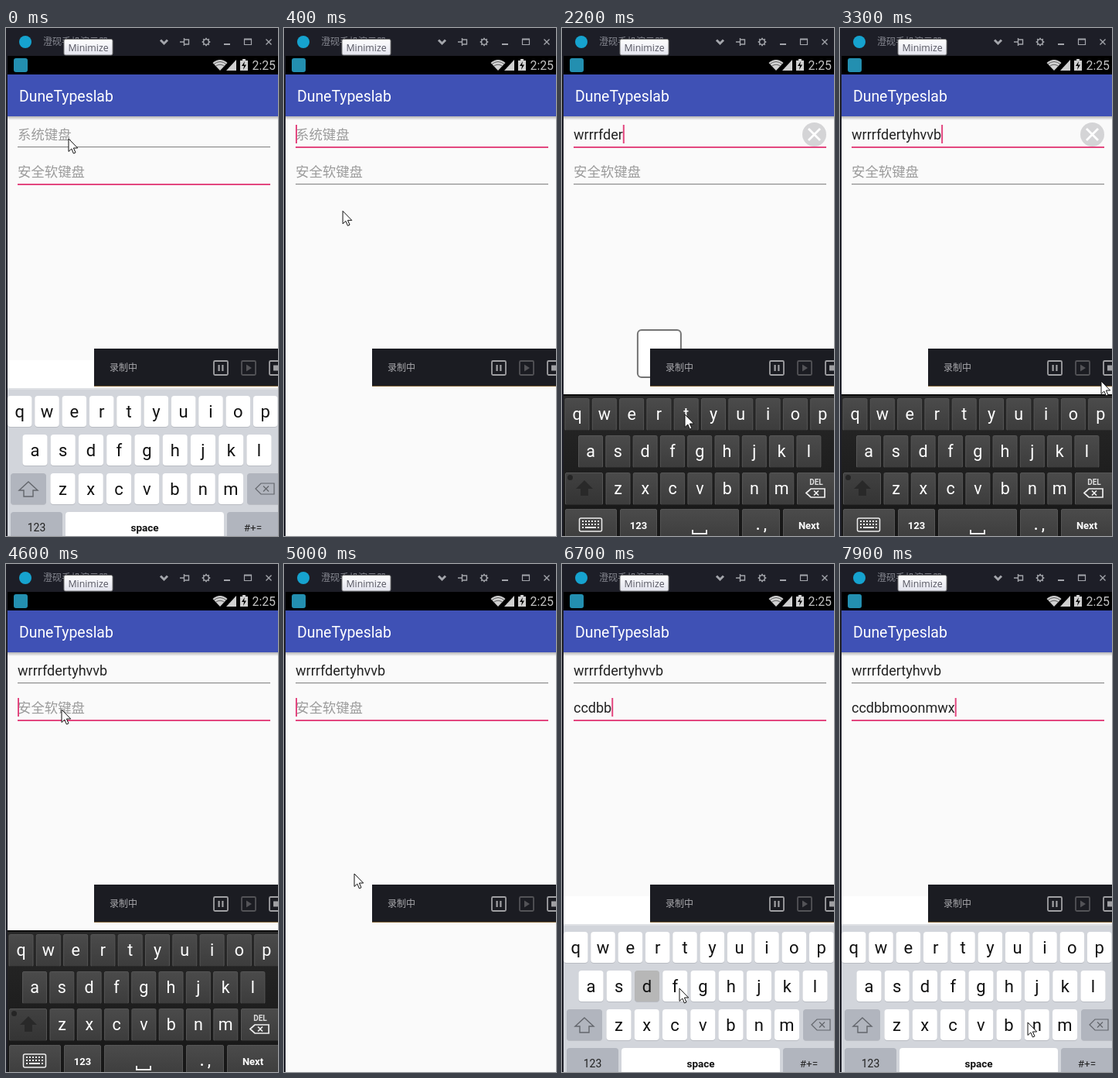
An HTML page with a canvas that plays this animation: 352x656 px, repeating every 8000 ms.

```html
<!DOCTYPE html>
<html lang="zh">
<head>
<meta charset="utf-8">
<style>
html, body { margin: 0; width: 100%; height: 100%; overflow: hidden; background: #fafafa; }
canvas { display: block; }
</style>
</head>
<body>
<canvas id="stage" width="352" height="656"></canvas>
<script>
const g = document.getElementById('stage').getContext('2d');
const ROBOTO = 'Roboto, sans-serif';
const CJK = '"Noto Sans CJK SC", "Noto Sans CJK", sans-serif';
const LOOP = 8000, STEP = 100;
const ROWS = ['qwertyuiop', 'asdfghjkl', 'zxcvbnm'];

// Typed characters: [time, letter]
const typed1 = [[1000, 'w'], [1100, 'r'], [1300, 'r'], [1500, 'r'], [1700, 'f'], [1800, 'd'], [1900, 'e'],
  [2100, 'r'], [2300, 't'], [2400, 'y'], [2500, 'h'], [2700, 'v'], [2800, 'v'], [3000, 'b']];
const typed2 = [[5600, 'c'], [5800, 'c'], [6000, 'd'], [6300, 'b'], [6400, 'b'], [6900, 'm'], [7000, 'o'],
  [7100, 'o'], [7300, 'n'], [7400, 'm'], [7600, 'w'], [7700, 'x']];

// Pointer stops besides the typed keys: [time, x, y]
const stops = [[0, 81, 143], [200, 81, 143], [800, 62, 503], [1100, 134, 506], [1500, 134, 506],
  [2200, 159, 499], [3300, 338, 456], [3800, 338, 456], [4400, 72, 188], [4600, 72, 188],
  [5000, 91, 400], [5400, 154, 598], [6600, 118, 548], [6700, 152, 548], [7900, 243, 592], [8000, 243, 592]];

function keyAt(ch, dark) {
  const row = ROWS.findIndex(r => r.includes(ch)), i = ROWS[row].indexOf(ch);
  if (dark) return { x: [19.5, 37, 72.5][row] + i * 35.3, y: 499 + row * 48 };
  return { x: [17.7, 37.5, 73.5][row] + i * [35.33, 36.25, 36.25][row], y: 495 + row * 50 };
}

const track = [...stops];
for (const [list, dark] of [[typed1, true], [typed2, false]])
  for (const [t, ch] of list)
    if (!track.some(s => s[0] === t)) {
      const k = keyAt(ch, dark);
      track.push([t, k.x + 8, k.y + 4]);
    }
track.sort((a, b) => a[0] - b[0]);

const ramp = (t, a, b) => {
  const u = Math.min(1, Math.max(0, (t - a) / (b - a)));
  return u * u * (3 - 2 * u);
};

function pointerAt(t) {
  const i = Math.max(1, track.findIndex(s => s[0] >= t));
  const [a, x, y] = track[i - 1], [b, x2, y2] = track[i], u = ramp(t, a, b);
  return [x + (x2 - x) * u, y + (y2 - y) * u];
}

function rect(x, y, w, h, fill) {
  g.fillStyle = fill;
  g.fillRect(x, y, w, h);
}

function box(x, y, w, h, r, fill, stroke, width = 1) {
  g.beginPath();
  g.roundRect(x, y, w, h, r);
  if (fill) { g.fillStyle = fill; g.fill(); }
  if (stroke) { g.strokeStyle = stroke; g.lineWidth = width; g.stroke(); }
}

function text(s, x, y, size, color, { font = ROBOTO, align = 'left', weight = 400 } = {}) {
  g.font = `${weight} ${size}px ${font}`;
  g.textAlign = align;
  g.fillStyle = color;
  g.fillText(s, x, y);
}
const label = (s, x, y, size, color, weight) => text(s, x, y, size, color, { align: 'center', weight });

function path(d, { fill, stroke, width = 1, x = 0, y = 0 }) {
  const p = new Path2D(d);
  g.save();
  g.translate(x, y);
  if (fill) { g.fillStyle = fill; g.fill(p); }
  if (stroke) { g.strokeStyle = stroke; g.lineWidth = width; g.stroke(p); }
  g.restore();
}

function circle(x, y, r, fill) {
  g.beginPath();
  g.arc(x, y, r, 0, 7);
  g.fillStyle = fill;
  g.fill();
}

function gradient(y1, y2, a, b) {
  const f = g.createLinearGradient(0, y1, 0, y2);
  f.addColorStop(0, a);
  f.addColorStop(1, b);
  return f;
}

function windowBar() {
  const c = '#a3a5ab';
  rect(0, 0, 352, 36, '#1d1e27');
  rect(0, 0, 2, 656, '#1d1e27');
  circle(25, 18, 8, '#16a3cf');
  text('澄砚手机演示器', 48, 22, 12, '#888a93', { font: CJK });
  path('M200 15.5l4.5 4.5l4.5-4.5', { stroke: c, width: 3 });
  path('M225 18h5M230.5 13v10M231 15h5.5v6H231', { stroke: c, width: 1.4 });
  for (let i = 0; i < 8; i++) {
    const a = i * Math.PI / 4, dx = Math.cos(a), dy = Math.sin(a);
    path(`M${259 + dx * 3.5} ${18 + dy * 3.5}L${259 + dx * 5.3} ${18 + dy * 5.3}`, { stroke: c, width: 1.8 });
  }
  g.beginPath();
  g.arc(259, 18, 3.4, 0, 7);
  g.strokeStyle = c;
  g.lineWidth = 1.4;
  g.stroke();
  rect(282, 20, 8, 2, c);
  path('M308.5 14.5h9v7h-9z', { stroke: c, width: 1.2 });
  rect(308, 13.5, 10, 2, c);
  path('M336.5 14.5l7 7m0-7l-7 7', { stroke: c, width: 1.4 });
  box(75, 14.5, 63, 20.5, 2, gradient(14, 35, '#fff', '#e3e4ee'), '#777');
  text('Minimize', 106.5, 29.5, 12.3, '#555560', { font: '"Open Sans", sans-serif', align: 'center' });
}

function statusBar() {
  const c = '#d0d0d0';
  rect(2, 36, 350, 24, '#000');
  box(10, 39, 18, 18, 3, '#238fb0');
  path('M277 55L267.5 45Q277 37 286.5 45z', { fill: c });
  path('M268.5 47Q277 40 285.5 47M271 49.5Q277 45 283 49.5', { stroke: '#444', width: .8 });
  path('M285 55H298V41z', { fill: c });
  path('M303 42h3v-2h4v2h3v13h-10z', { fill: c });
  path('M309 43l-4 6h3l-1 5l4-6.5h-3z', { fill: '#000' });
  text('2:25', 318.5, 54, 15.8, '#c4c4c4');
}

function field(y, hint, value, focused, caret) {
  if (value) text(value, 15, y + 6, 18, '#222');
  else text(hint, 15, y + 6, 17.4, '#9b9b9b', { font: CJK });
  if (focused) rect(15, y + 15, 327, 2, '#e3477f');
  else rect(15, y + 15, 327, 1.2, '#8c8c8c');
  if (focused && caret) {
    g.font = `18px ${ROBOTO}`;
    rect(15 + g.measureText(value).width, y - 13, 2, 24, '#e3477f');
  }
}

function lightKeys(dy, pressed) {
  g.save();
  g.translate(0, dy);
  rect(2, 429, 350, 36, '#fff');
  rect(2, 465, 350, 191, '#d2d5db');
  rect(2, 465, 350, 2, '#dfe1e5');
  const key = (x, y, w, fill) => {
    box(x, y + 1, w, 40, 4, '#b9bcc3');
    box(x, y, w, 40, 4, fill);
  };
  ROWS.forEach((row, r) => [...row].forEach(ch => {
    const { x, y } = keyAt(ch), w = r ? 32 : 31.5;
    key(x - w / 2, y - 20, w, ch === pressed ? '#b7b7b7' : '#fff');
    label(ch, x, y + 8, 22, '#111');
  }));
  const grey = '#b1b5be';
  key(6, 575, 46, grey);
  path('M29 586L41 597H35V605H23V597H17z', { stroke: '#63666c', width: 1.4 });
  key(312, 575, 46, grey);
  path('M323 595L330 588H347V602H330zM333 591.5l7 7m0-7l-7 7', { stroke: '#63666c', width: 1.2 });
  key(6, 625, 67, grey);
  label('123', 39.5, 650, 14, '#222');
  key(77, 625, 205, '#fff');
  label('space', 179.5, 650, 13.5, '#111', 700);
  key(286, 625, 72, grey);
  label('#+=', 319.5, 650, 13.5, '#222');
  g.restore();
}

function darkKeys(dy) {
  g.save();
  g.translate(0, dy);
  rect(2, 473, 350, 183, gradient(473, 656, '#282828', '#161616'));
  rect(2, 473, 350, 1.5, '#000');
  const key = (x, y, w, top = '#4b4b4b', low = '#3c3c3c') => {
    box(x + .5, y + .5, w - 1, 41, 1.5, gradient(y, y + 42, top, low), '#555');
    rect(x + 1, y + 41, w - 2, 1, '#2a2a2a');
  };
  for (const ch of ROWS.join('')) {
    const { x, y } = keyAt(ch, true);
    key(x - 16, y - 21, 32);
    label(ch, x, y + 7, 21.5, '#fff');
  }
  key(4, 574, 49, '#414141', '#343434');
  path('M29 584L40 595H34V604H24V595H18z', { fill: '#292929' });
  circle(10.5, 580.5, 3.5, '#252525');
  key(304, 574, 54);
  label('DEL', 329, 590, 10, '#ddd', 700);
  path('M316 600.5L322 595H340V606H322zM326 597.5l6 6m0-6l-6 6', { stroke: '#eee', width: 1.7 });
  key(4, 621, 67);
  box(22.5, 633, 29, 17, 2, null, '#eee', 1.5);
  for (let r = 0; r < 3; r++)
    for (let i = 0; i < 6; i++) rect(26 + i * 4, 636 + r * 4, 2, 2, '#eee');
  rect(30, 644, 14, 2, '#eee');
  key(75, 621, 48);
  label('123', 99, 647, 13, '#fff', 700);
  key(127, 621, 102);
  path('M169 648v5h18v-5', { stroke: '#eee', width: 2 });
  key(233, 621, 49);
  label('. ,', 258, 648, 18, '#fff', 700);
  key(286, 621, 72);
  label('Next', 319.5, 647, 13, '#fff', 700);
  g.restore();
}

function recorder() {
  rect(114, 414, 238, 49, '#1b1c22');
  rect(114, 462, 238, 1, '#806438');
  text('录制中', 134, 443, 12, '#a9a9ad', { font: CJK });
  const on = '#a0a0a3', off = '#535357';
  [on, off, on].forEach((c, i) => box(269 + i * 36, 430, 18, 18, 1.5, null, c, 1.8));
  rect(274.5, 435, 2.2, 8, on);
  rect(279.3, 435, 2.2, 8, on);
  path('M311 434.5L318 439L311 443.5z', { fill: off });
  rect(346, 435.5, 7, 7, on);
}

function draw(t) {
  const shown = list => list.filter(k => k[0] <= t);
  const a = shown(typed1), b = shown(typed2);
  const focus = t >= 200 && t < 4600 ? 1 : 2;
  const last = (focus === 1 ? a : b).at(-1);
  const active = Math.max(focus === 1 ? 200 : t < 200 ? -500 : 4600, last ? last[0] : -500);
  const caret = Math.floor((t - active) / 500) % 2 === 0;
  const value = list => list.map(k => k[1]).join('');

  rect(0, 0, 352, 656, '#fafafa');
  field(138, '系统键盘', value(a), focus === 1, caret);
  field(186, '安全软键盘', value(b), focus === 2, caret);
  if (focus === 1 && a.length) {
    circle(326.5, 137.5, 15.5, '#d4d4d6');
    path('M319 130l15 15m0-15l-15 15', { stroke: '#fff', width: 2.8 });
  }
  rect(2, 114, 350, 5, gradient(114, 119, 'rgba(0,0,0,.28)', 'rgba(0,0,0,0)'));
  rect(2, 60, 350, 54, '#3f51b5');
  text('DuneTypeslab', 17, 94.5, 19.4, '#fff');

  const light = t < 2000 ? 1 - ramp(t, 200, 400) : ramp(t, 5100, 5400);
  const dark = ramp(t, 400, 700) - ramp(t, 4600, 4800);
  if (dark > 0) darkKeys((1 - dark) * 183);
  if (light > 0) {
    const hit = b.length && t - b.at(-1)[0] < STEP ? b.at(-1)[1] : '';
    lightKeys((1 - light) * 227, t >= 6600 && t < 6800 ? 'd' : hit);
  }
  if (a.length && t - a.at(-1)[0] < 2 * STEP) {
    const k = keyAt(a.at(-1)[1], true);
    box(k.x + .5 - 28, k.y - 109, 56, 61, 5, '#fff', '#747474', 2);
  }
  recorder();
  windowBar();
  statusBar();
  const [x, y] = pointerAt(t);
  path('M0 0V16.5L3.8 13L6.4 19L9 17.8L6.4 12H11.7z', { x, y, fill: '#fff', stroke: '#111' });
}

function tick() {
  const t = performance.now() % LOOP;
  draw(Math.floor(t / STEP) * STEP);
  requestAnimationFrame(tick);
}
tick();
</script>
</body>
</html>
```
